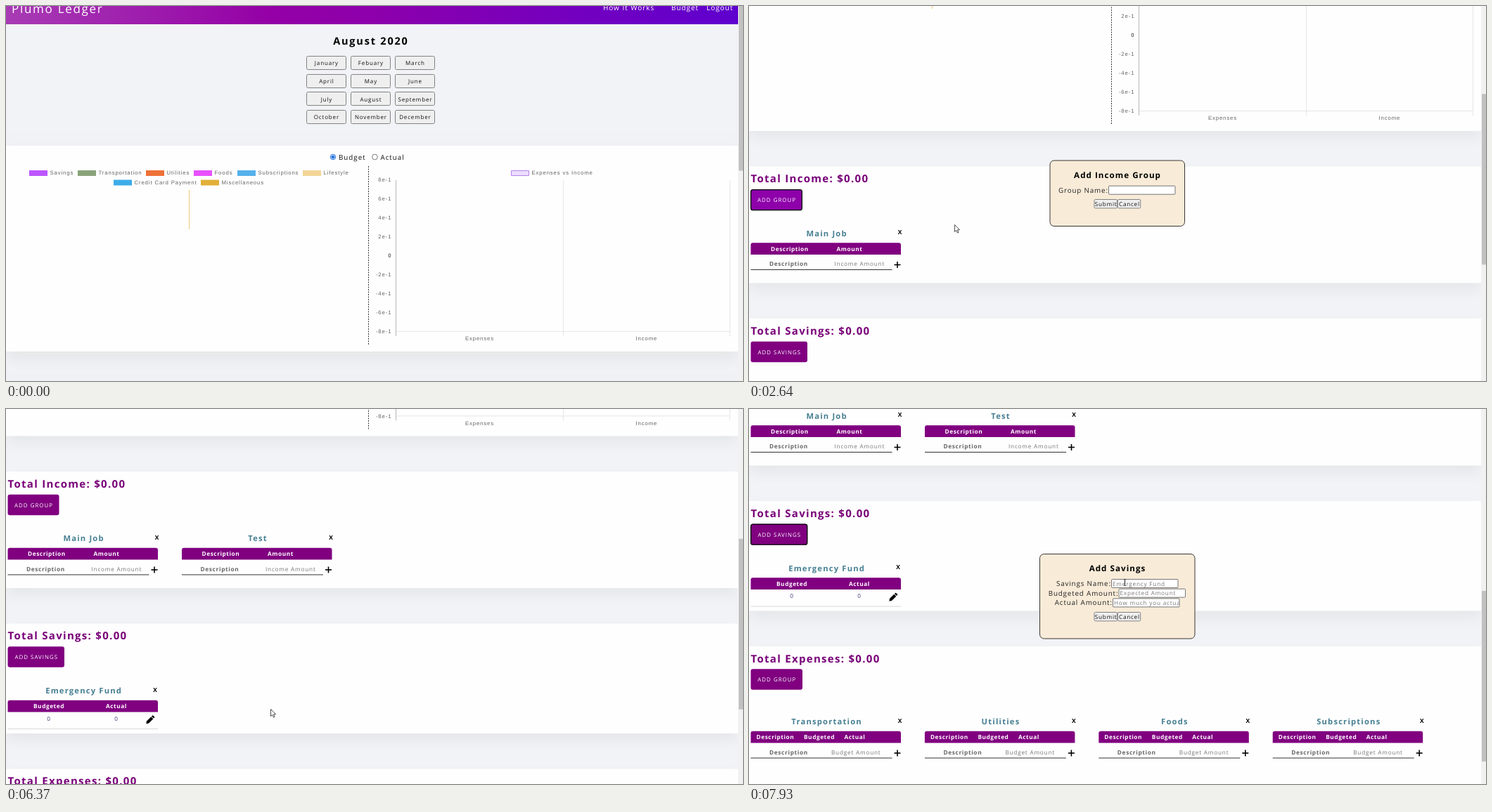
These frames come from a looping animation (1048x534 px, 8 s). An HTML page with a canvas:

```html
<!DOCTYPE html>
<html lang="en">
<head>
<meta charset="utf-8">
<title>Budget planner</title>
<style>
html, body { margin: 0; width: 100%; height: 100%; overflow: hidden; background: #f2f3f7; }
canvas { display: block; width: 1048px; height: 534px; }
</style>
</head>
<body>
<canvas id="stage" width="1048" height="534"></canvas>
<script>
const ctx = document.getElementById('stage').getContext('2d');
const W = 1048, H = 534, LOOP = 8000, STEP = 80;
const UI = '"Open Sans", "Noto Sans", sans-serif';
const CHART = '"Liberation Sans", Arial, sans-serif';
const PURPLE = '#800080', TEAL = '#467f92', PAPER = '#fefefe';

// The screen only refreshes inside these spans, about every STEP ms
const bursts = [[70, 460], [610, 840], [1070, 1850], [1930, 2320], [2490, 2960], [3120, 3480],
  [3650, 4250], [4650, 5210], [5360, 5590], [5740, 6220], [6370, 7160], [7230, 7930]];

// Pointer strokes: time span, end point and, for arcs, a control point
const strokes = [
  { span: [70, 460], end: [209, 330] },
  { span: [1070, 1850], end: [55, 281] },
  { span: [1930, 2320], end: [270, 301] },
  { span: [2490, 2960], end: [545, 262], via: [333, 344] },
  { span: [3120, 3480], end: [552, 284] },
  { span: [3890, 4250], end: [505, 283], via: [267, 295] },
  { span: [4700, 5210], end: [352, 339], via: [225, 340] },
  { span: [5360, 5590], end: [474, 400] },
  { span: [5740, 6220], end: [376, 427], via: [125, 180] },
  { span: [6540, 7000], end: [55, 183] },
  { span: [7230, 7930], end: [534, 247], via: [295, 355] }
];

const clicks = [1760, 2950, 3860, 4640, 7070];

const part = (t, a, b) => Math.min(1, Math.max(0, (t - a) / (b - a)));
const easeOut = k => 1 - (1 - k) ** 2;
const easeInOut = k => k < 0.5 ? 4 * k ** 3 : 1 - 4 * (1 - k) ** 3;

function snap(t) {
  let shown = 0;
  for (const [from, to] of bursts) {
    if (t < from) break;
    const n = Math.round((to - from) / STEP), gap = (to - from) / n;
    shown = from + gap * Math.min(n, Math.floor((t - from + 9) / gap));
  }
  return shown;
}

function scrollAt(t) {
  return 188 * easeOut(part(t, 560, 840))
    + 126 * easeOut(part(t, 1030, 1170))
    + 314 * easeOut(part(t, 6300, 6575));
}

function pointerAt(t) {
  let p = [968, 526];
  for (const { span, end, via } of strokes) {
    if (t < span[0]) break;
    const k = easeInOut(part(t, ...span)), from = p;
    p = end.map((e, i) => {
      const c = via ? via[i] : (from[i] + e) / 2;
      return (1 - k) ** 2 * from[i] + 2 * k * (1 - k) * c + k * k * e;
    });
  }
  return p;
}

function setFont(size, bold, gap, font) {
  ctx.font = `${bold ? 700 : 400} ${size}px ${font}`;
  ctx.letterSpacing = gap + 'px';
}

// y is the middle of the capitals
function text(str, x, y, { size = 8.2, bold = 0, color = '#111', gap = 0.8, align = 'left', font = UI } = {}) {
  setFont(size, bold, gap, font);
  ctx.fillStyle = color;
  const w = ctx.measureText(str).width - gap;
  const shift = align === 'center' ? w / 2 : align === 'right' ? w : 0;
  ctx.fillText(str, x - shift, y + size * 0.36);
}

function box(x, y, w, h, fill, r = 0, stroke, line = 1) {
  ctx.beginPath();
  ctx.roundRect(x, y, w, h, r);
  if (fill) { ctx.fillStyle = fill; ctx.fill(); }
  if (stroke) { ctx.strokeStyle = stroke; ctx.lineWidth = line; ctx.stroke(); }
}

function seg(x1, y1, x2, y2, color, line = 1) {
  ctx.beginPath();
  ctx.moveTo(x1, y1);
  ctx.lineTo(x2, y2);
  ctx.strokeStyle = color;
  ctx.lineWidth = line;
  ctx.stroke();
}

function disc(x, y, r, fill, stroke) {
  ctx.beginPath();
  ctx.arc(x, y, r, 0, Math.PI * 2);
  ctx.fillStyle = fill;
  ctx.fill();
  if (stroke) { ctx.strokeStyle = stroke; ctx.lineWidth = 1; ctx.stroke(); }
}

function shaded(color, blur, dy, paint) {
  ctx.save();
  ctx.shadowColor = color;
  ctx.shadowBlur = blur;
  ctx.shadowOffsetY = dy;
  paint();
  ctx.restore();
}

function card(y, h) {
  shaded('rgba(0,0,0,.055)', 20, 10, () => box(0, y, 1041, h, PAPER));
}

function header() {
  const g = ctx.createLinearGradient(0, 0, 1041, 0);
  g.addColorStop(0, '#a83cb4');
  g.addColorStop(0.36, '#9400a6');
  g.addColorStop(0.5, '#8d00ab');
  g.addColorStop(1, '#5f00cf');
  box(0, -40, 1041, 66, g);
  text('Plumo Ledger', 8, 4, { size: 17, gap: 1.7, color: '#fff' });
  const nav = { size: 10, gap: 0.95, color: '#fff' };
  text('How It Works', 849, 2, nav);
  text('Budget', 946, 2, nav);
  text('Logout', 996, 2, nav);
}

function months() {
  text('August 2020', 518, 49.5, { size: 14.5, bold: 1, gap: 1.8, align: 'center', color: '#000' });
  'January Febuary March April May June July August September October November December'
    .split(' ').forEach((m, i) => {
      const x = 427.5 + (i % 3) * 63, y = 71.5 + Math.floor(i / 3) * 25.7;
      box(x, Math.floor(y) + 0.5, 56, 19, '#efefef', 2, '#828282');
      text(m, x + 28, y + 10, { size: 8, gap: 0.85, align: 'center' });
    });
}

const label = { size: 7.8, gap: 0.85, color: '#666', font: CHART };

// A centred row of swatches with names
function legend(items, mid, y) {
  setFont(label.size, 0, label.gap, CHART);
  const widths = items.map(([name]) => 35.2 + ctx.measureText(name).width);
  let x = mid - (widths.reduce((a, b) => a + b) - 6.5) / 2;
  items.forEach(([name, fill, stroke], i) => {
    const left = Math.round(x), inset = stroke ? 0.5 : 0;
    box(left + inset, y - 4 + inset, 26 - 2 * inset, 8 - 2 * inset, fill, 0, stroke);
    text(name, left + 29.5, y - 0.4, label);
    x += widths[i];
  });
}

function charts() {
  card(199, 293);
  disc(465, 215, 3.8, '#fff', '#2a75e0');
  disc(465, 215, 2.5, '#2a75e0');
  disc(524.5, 215, 3.8, '#fff', '#767676');
  text('Budget', 473, 215.5, { size: 9.8, gap: 1 });
  text('Actual', 532.5, 215.5, { size: 9.8, gap: 1 });

  legend([['Savings', '#bc56ff'], ['Transportation', '#8aa37a'], ['Utilities', '#ef7139'],
    ['Foods', '#e751fd'], ['Subscriptions', '#56b1eb'], ['Lifestyle', '#f2d597']], 260, 238);
  legend([['Credit Card Payment', '#3dace9'], ['Miscellaneous', '#e2b03a']], 260, 251.5);
  seg(260.5, 262, 260.5, 318, '#ecca80');

  ctx.setLineDash([2, 1.5]);
  seg(515.5, 228, 515.5, 483, '#333');
  ctx.setLineDash([]);

  legend([['Expenses vs Income', '#ebddfc', '#b583ec']], 776, 238);
  for (let i = 0; i < 9; i++) {
    const v = 8 - 2 * i;
    text(v ? v + 'e-1' : '0', 547.5, 247.5 + i * 27, { ...label, align: 'right', bold: !v });
  }
  seg(554.5, 463.5, 1029.5, 463.5, '#e6e6e6');
  [['#b8b8b8'], ['#e6e6e6', 'Expenses'], ['#e6e6e6', 'Income']].forEach(([color, name], i) => {
    const x = 554.5 + i * 237.5;
    seg(Math.floor(x) + 0.5, 248, Math.floor(x) + 0.5, 470, color);
    if (name) text(name, x - 119, 473.5, { ...label, align: 'center' });
  });
}

function title(str, y) {
  text(str, 2.5, y + 0.5, { size: 15, bold: 1, gap: 1.3, color: '#780078' });
}

function button(name, y, w, hover, focus) {
  box(2.5, y, w, 29.5, hover ? '#8e00aa' : PURPLE, 3);
  if (focus) box(2.7, y + 0.4, w - 0.4, 29, null, 3, '#000', 1.3);
  text(name, 2.5 + w / 2, y + 15.2, { size: 7.9, gap: 1, color: '#fff', align: 'center' });
}

// Group heading, close mark and header bar; heads holds [label, offset]
function group(name, x, y, heads, close = 212) {
  text(name, x + 107.5, y, { size: 11.2, bold: 1, gap: 1.2, color: TEAL, align: 'center' });
  text('X', x + close, y - 1.5, { size: 8.4, bold: 1, align: 'center', color: '#000' });
  box(x, y + 13.8, 213.5, 16.7, PURPLE, [3, 3, 0, 0]);
  heads.forEach(([s, dx]) => text(s, x + dx, y + 22.3, { size: 8.3, bold: 1, gap: 0.55, color: '#fff' }));
}

function entry(x, y, hint, dx) {
  text('Description', x + 26.5, y, { size: 8.3, bold: 1, gap: 0.65, color: '#666' });
  text(hint, x + dx, y, { color: '#777' });
  seg(x, y + 8, x + 201, y + 8, '#333');
  seg(x + 204, y + 1, x + 213, y + 1, '#000', 1.6);
  seg(x + 208.5, y - 3.5, x + 208.5, y + 5.5, '#000', 1.6);
}

function incomeGroup(name, x) {
  group(name, x, 637.5, [['Description', 28.5], ['Amount', 122]]);
  entry(x, 681.5, 'Income Amount', 119);
}

function pencil(x, y) {
  ctx.save();
  ctx.translate(x, y);
  ctx.rotate(-Math.PI / 4);
  ctx.beginPath();
  ctx.moveTo(-8, 0);
  ctx.lineTo(-5, -2.1);
  ctx.lineTo(4, -2.1);
  ctx.lineTo(4, 2.1);
  ctx.lineTo(-5, 2.1);
  ctx.fillStyle = '#000';
  ctx.fill();
  box(4.8, -2.1, 2.4, 4.2, '#000', 0.8);
  ctx.restore();
}

function sections(t) {
  card(542.5, 166);
  title('Total Income: $0.00', 559.5);
  button('ADD GROUP', 575.3, 73, t >= 1600 && t < 2950, t >= 1840 && t < 2950);
  incomeGroup('Main Job', 2.5);
  if (t >= 5360) incomeGroup('Test', 250);

  card(759, 156.5);
  title('Total Savings: $0.00', 776);
  button('ADD SAVINGS', 791.8, 80.5, t >= 6915 && t < 7380, t >= 7075);
  group('Emergency Fund', 2.5, 854.5, [['Budgeted', 36.5], ['Actual', 139.5]], 209.5);
  for (const x of [60.5, 156.5]) text('0', x, 894.5, { color: '#44306e', align: 'center' });
  pencil(205, 896);
  seg(2.5, 909, 216, 909, '#d8d8d8');

  card(966, 400);
  title('Total Expenses: $0.00', 983);
  button('ADD GROUP', 998.3, 73.5);
  ['Transportation', 'Utilities', 'Foods', 'Subscriptions'].forEach((name, i) => {
    const x = 2.5 + i * 247.4;
    group(name, x, 1073, [['Description', 8], ['Budgeted', 75.5], ['Actual', 133]]);
    entry(x, 1117, 'Budget Amount', 114.5);
  });
}

function field(name, y, x, hint = '') {
  text(name, x - 1, y, { size: 9.8, gap: 0.85, color: '#222', align: 'right' });
  box(x + 0.5, y - 5.8, 94.5, 12, '#fff', 1, '#767676');
  ctx.save();
  ctx.beginPath();
  ctx.rect(x, y - 6, 94.5, 12);
  ctx.clip();
  text(hint, x + 2, y + 0.4, { color: '#777' });
  ctx.restore();
}

function dialog(name, x, y, w, h, buttonsY) {
  box(x + 0.5, y + 0.5, w - 1, h - 1, '#f8ebd8', 6, '#3a3632');
  text(name, 523.5, y + 21.3, { size: 11.6, bold: 1, gap: 1.05, align: 'center', color: '#000' });
  ['Submit', 'Cancel'].forEach((s, i) => {
    const bx = 491 + i * 33.3;
    box(bx, buttonsY, 32.4, 12.4, '#efefef', 1.5, '#828282');
    text(s, bx + 16.2, buttonsY + 6.4, { align: 'center', gap: 0.75 });
  });
}

function incomeDialog(t) {
  dialog('Add Income Group', 427.5, 219.5, 192.5, 94.5, 275.5);
  field('Group Name:', 262, 511);
  if (t < 2950) return;
  const filled = t >= 3390;
  box(511.8, 256, 94.4, 12.4, filled ? '#e8f0fe' : '#fff', 1.5, '#101010', 1.8);
  if (filled) text('Test', 513, 262.7);
  if (t < 3120 || t >= 3945) return;
  shaded('rgba(0,0,0,.35)', 3, 1, () => box(511, 269.5, 121, 32.5, '#fff', 1));
  if (filled) box(511, 274.5, 121, 22.5, '#c8c8c8');
  text('Test', 518.5, 286, { size: 7.5, gap: 0 });
}

function savingsDialog() {
  dialog('Add Savings', 413, 206, 221.5, 121.5, 289.5);
  field('Savings Name:', 248.3, 515, 'Emergency Fund');
  field('Budgeted Amount:', 262, 525.5, 'Expected Amount');
  field('Actual Amount:', 275.7, 517, 'How much you actually saved');
}

function scrollbar(s) {
  box(1041, 0, 7, H, '#f1f1f1');
  box(1042, s * 0.426 - 8.5, 6, 243, '#c1c1c1');
}

function pointer(t) {
  if (t < 70) return;
  const [x, y] = pointerAt(t);
  if (clicks.some(c => t >= c && t < c + 100)) disc(x, y, 8, 'rgba(228,222,70,.88)');
  if (t >= 2930 && t < 3200 || t > 7900) {
    seg(x + 0.5, y - 4, x + 0.5, y + 4.5, '#222');
    for (const dy of [-4.5, 4.5]) seg(x - 1, y + dy, x + 2, y + dy, '#222', 0.7);
    return;
  }
  ctx.beginPath();
  [[0, 0], [0, 10], [2.3, 8], [4, 11.6], [5.6, 10.9], [4, 7.3], [7, 7.2]]
    .forEach(([dx, dy]) => ctx.lineTo(x + 0.5 + dx, y + 0.5 + dy));
  ctx.closePath();
  ctx.fillStyle = '#fff';
  ctx.fill();
  ctx.strokeStyle = '#222';
  ctx.lineWidth = 0.8;
  ctx.lineJoin = 'round';
  ctx.stroke();
}

function draw(now) {
  const t = snap(now % LOOP), s = scrollAt(t);
  ctx.textRendering = 'geometricPrecision';
  box(0, 0, W, H, '#f2f3f6');
  ctx.save();
  ctx.translate(0, -s);
  header();
  months();
  charts();
  sections(t);
  ctx.restore();
  scrollbar(s);
  if (t >= 1930 && t < 4720) incomeDialog(t);
  if (t >= 7150) savingsDialog();
  pointer(t);
}

const start = performance.now();
function tick() {
  draw(performance.now() - start);
  requestAnimationFrame(tick);
}
tick();
</script>
</body>
</html>
```
